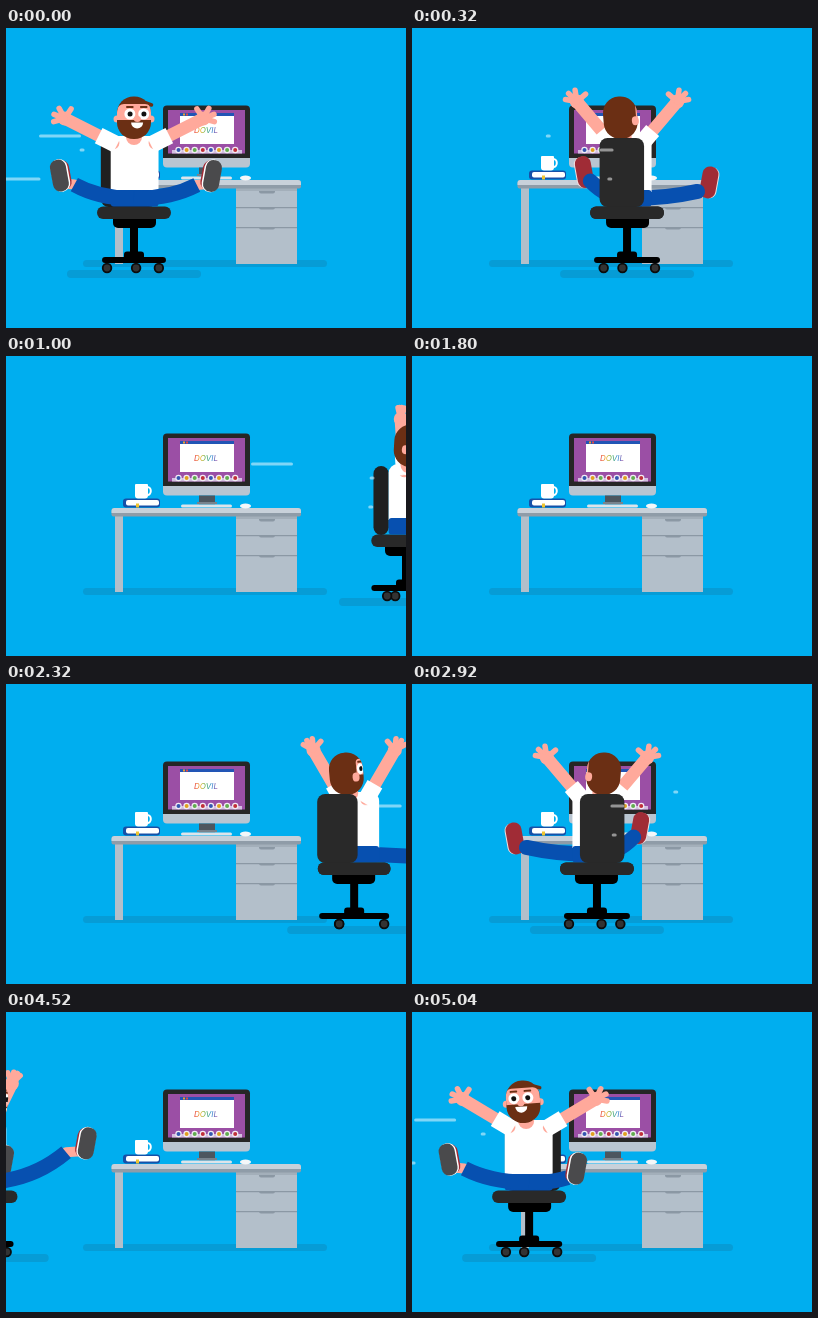
An HTML page with a canvas that plays this animation: 400 px wide and 300 px high, repeating every 5080 ms.

```html
<!DOCTYPE html>
<html lang="en">
<head>
<meta charset="utf-8">
<title>Spinning office chair</title>
<style>
  html, body { margin: 0; width: 100%; height: 100%; overflow: hidden; background: #00aeef; }
  canvas { display: block; }
</style>
</head>
<body>
<canvas id="stage" width="400" height="300"></canvas>
<script>
const ctx = document.getElementById('stage').getContext('2d');
const LOOP = 5080, STEP = 40, SPEED = 0.272, DEG = Math.PI / 180;
const SKIN = '#ffa99b', HAIR = '#6b2f14', JEANS = '#0750b0', SHOE = '#a02c36';
const SHADOW = '#069cd6', METAL = '#b3bfca', SEAT = '#292929';

const mod = (a, n) => ((a % n) + n) % n;

function box(x, y, w, h, color, r = 0) {
  ctx.fillStyle = color;
  ctx.beginPath();
  ctx.roundRect(x, y, w, h, r);
  ctx.fill();
}

function dot(x, y, rx, color, ry = rx) {
  ctx.fillStyle = color;
  ctx.beginPath();
  ctx.ellipse(x, y, rx, ry, 0, 0, 7);
  ctx.fill();
}

function line(x1, y1, x2, y2, color, width, cap = 'round') {
  ctx.strokeStyle = color;
  ctx.lineWidth = width;
  ctx.lineCap = cap;
  ctx.beginPath();
  ctx.moveTo(x1, y1);
  ctx.lineTo(x2, y2);
  ctx.stroke();
}

function group(x, y, turn, draw) {
  ctx.save();
  ctx.translate(x, y);
  ctx.rotate(turn);
  draw();
  ctx.restore();
}

function drawScreen() {
  box(157, 128, 87, 11.5, '#b9c5d1', [0, 0, 4, 4]);
  box(157, 77.5, 87, 52.5, '#262626', [4, 4, 0, 0]);
  box(162, 82, 77, 43.5, '#9b4fa5');
  box(174, 85, 54, 31, '#fff');
  box(174, 85, 54, 3, '#2255b5');
  box(177, 85.5, 2, 2, '#f0a030');
  box(180, 85.5, 2, 2, '#e04848');
  const rainbow = ctx.createLinearGradient(189, 0, 211, 0);
  ['#e8443a', '#f0b429', '#4caf50', '#2a8fd8', '#9b4fa5']
    .forEach((c, i) => rainbow.addColorStop(i / 4, c));
  ctx.fillStyle = rainbow;
  ctx.font = 'italic 8px Inter, sans-serif';
  ctx.textAlign = 'center';
  ctx.fillText('DOVIL', 200, 105);
  box(166, 122, 70, 3.5, '#d3bfe0');
  const icons = ['#3456b0', '#e0a020', '#62ac50', '#c0303a'];
  for (let i = 0; i < 8; i++) {
    dot(172.5 + i * 8.1, 122, 3.2, '#f2ecf5');
    dot(172.5 + i * 8.1, 122, 2, icons[i % 4]);
  }
}

function drawDesk() {
  box(77, 232, 244, 7, SHADOW, 3.5);
  box(109, 158, 8, 78, METAL);
  box(230, 158, 61, 78, METAL);
  box(230, 160, 61, 3, '#a3afba');
  for (const y of [163, 179, 199]) {
    if (y > 163) box(230, y, 61, 1.2, '#8b98a4');
    box(253, y, 16, 2.5, '#8b98a4', [0, 0, 2, 2]);
  }
  box(105.5, 152, 189.5, 8.5, '#8f9ca8', [3, 3, 2, 2]);
  box(105.5, 152, 189.5, 5, '#c8d1da', [3, 3, 0, 0]);
  drawScreen();
  box(193, 139.5, 16, 9, '#4d565f');
  box(191, 146, 20, 2, '#78838d');
  box(175, 148.5, 51, 3, '#dde4ea', 1.5);
  dot(239.5, 150, 5.5, '#f4f7f9', 2.5);
  // Books and cup
  box(117, 142.5, 37, 9, '#1650a8', 3);
  box(120, 144, 33, 5.5, '#fff', 2);
  box(130, 147.5, 3, 4, '#f0c52e');
  box(129, 128, 13, 14.5, '#fff', [1, 1, 3, 3]);
  ctx.strokeStyle = '#fff';
  ctx.lineWidth = 2;
  ctx.beginPath();
  ctx.ellipse(141.5, 135, 3.3, 4, 0, 0, 7);
  ctx.stroke();
}

function drawBase(time) {
  const legs = [0, 120, 240].map(d => 30 * Math.sin((4 + d + 0.335 * time) * DEG));
  const reach = Math.max(...legs.map(Math.abs)) + 5;
  box(-67, 242, 134, 8, SHADOW, 4);
  box(-4, 198, 8, 28, '#000');
  box(-10, 223.5, 20, 8, '#000', 3);
  box(-reach, 229, reach * 2, 6, '#000', 3);
  for (const x of legs) {
    dot(x, 240, 5.2, '#0b0b0b');
    dot(x, 240, 3.4, '#333');
  }
  box(-21, 188, 43, 12, '#000', [0, 0, 5, 5]);
}

function drawSeat(cos) {
  const half = 34.5 + 2.5 * Math.abs(cos);
  box(-half, 178.5, half * 2, 12.5, SEAT, 6);
}

function drawBackrest(sin, cos) {
  const w = (49 + 6 * cos) * Math.abs(cos) + 11 * Math.abs(sin);
  box(-25 * sin - w / 2, 110, w, 69, cos > 0 ? '#202020' : SEAT, Math.min(8, w / 2));
}

function drawShoe(x, y, front) {
  const side = Math.sign(x) || 1;
  group(x, y, side * 0.18, () => {
    if (front) {
      box(-8 - side * 3, -15, 16, 30, SHOE, 8);
      box(-8.5 - side, -16.5, 17, 33, '#fff', 8.5);
    } else {
      box(-8 + side, -15.5, 16, 31, '#f0dede', 7);
    }
    box(-8, -16, 16, 32, front ? '#4a4a4c' : SHOE, 7.5);
  });
}

function drawLeg([x, y], front) {
  const endX = x * (front ? 0.8 : 0.86), endY = y + 9;
  if (front) line(endX, endY, x * 0.94, y + 8, SKIN, 10);
  else drawShoe(x, y, false);
  ctx.strokeStyle = JEANS;
  ctx.lineWidth = 15;
  ctx.lineCap = front ? 'butt' : 'round';
  ctx.beginPath();
  ctx.moveTo(0, 170);
  ctx.quadraticCurveTo(x * 0.45, 171, endX, endY);
  ctx.stroke();
  if (front) drawShoe(x, y, true);
}

function drawArm(x, y, openness) {
  const shoulder = x * 0.3, side = x < 0 ? 1 : -1;
  const aim = Math.atan2(y - 115, x - shoulder);
  const along = k => [shoulder + (x - shoulder) * k, 115 + (y - 115) * k];
  line(shoulder, 115, x, y, SKIN, 12.5);
  line(...along(-0.08), ...along(0.3), '#fff', 17, 'butt');
  dot(x, y, 7, SKIN);
  for (const spread of [1.7, 0.6, -0.1, -0.75]) {
    const a = aim + side * spread * openness;
    line(x, y, x + 11.5 * Math.cos(a), y + 11.5 * Math.sin(a), SKIN, 5.5);
  }
}

function drawFace(angle, sin, cos, edge) {
  const side = sin < 0 ? -1 : 1;
  box(side > 0 ? edge : -18, -14, 18 - edge, 16, SKIN, [7, 7, 0, 0]);
  for (const offset of [-0.43, 0.43]) {
    const facing = Math.cos(angle + offset);
    if (facing < -0.6) continue;
    const x = 17 * Math.sin(angle + offset) - 2 * sin;
    const rx = 5.5 * Math.min(1, 0.8 + 0.5 * facing);
    dot(x, -4, rx, '#fff', 5.5);
    dot(x + sin, -4, Math.min(2.5, rx / 2), '#111', 2.5);
    box(x - rx * 0.7, -12, rx * 1.4, 2, HAIR, 1);
  }
  if (cos > 0) {
    dot(16 * sin, 1, 3.5, SKIN, 3);
    ctx.fillStyle = '#fff';
    ctx.beginPath();
    ctx.arc(15 * sin, 4.5, 6, 0, Math.PI);
    ctx.fill();
  }
}

function drawHead(angle, sin, cos) {
  const x = 9 * Math.sin(2 * angle - 24 * DEG), side = sin < 0 ? -1 : 1;
  const edge = 17 * Math.sin(Math.acos(cos) - 1.75);
  dot(x * 0.5, 109, 8, SKIN);
  group(x, 90, x * 0.012, () => {
    if (cos > 0.7) {
      dot(-17, 1, 3.5, SKIN);
      dot(17, 1, 3.5, SKIN);
      line(12, -15, 17.5, -13, HAIR, 3.5);
    }
    ctx.save();
    ctx.beginPath();
    ctx.roundRect(-17, -21.5, 34, 42.5, 16.5);
    ctx.clip();
    box(-18, -22, 36, 44, HAIR);
    drawFace(angle, sin, cos, edge);
    ctx.restore();
    if (cos <= 0.7) dot(side * (edge - 1), 4, 3.5, SKIN, 4.5);
  });
}

// Each line shoots up behind the chair, then shrinks to a dash that falls back.
function drawTrails(time) {
  for (const [y, peak, top] of [[108, 38, -34], [122, 277, -7], [151, 195, 4]]) {
    const age = mod(time - peak + 250, 560) - 250;
    const head = top + (age < 0 ? 0.5 : -0.15) * age;
    const length = Math.max(5, 42 - 0.65 * Math.max(age, 0));
    line(head - length + 1.5, y, head - 1.5, y, 'rgba(255,255,255,.5)', 3);
  }
}

function drawRider(time) {
  const degrees = 12 + 0.513 * time - 0.00008 * time * time;
  const angle = degrees * DEG, sin = Math.sin(angle), cos = Math.cos(angle);
  const front = cos >= 0, half = 20 + 4 * Math.abs(cos);

  const reach = Math.cos(angle - 6 * DEG);
  const handX = reach * Math.sqrt(Math.abs(reach)) * (62 + 8 * cos);
  const handY = 57 + reach * reach * (25 + 8 * cos) + 5 * sin;
  const feet = [
    [85 * sin * Math.abs(sin) - 80 * cos, 151 - 3.5 * cos],
    [86 * sin + 62 * cos, 151 + 2 * cos - 24 * sin]
  ];
  const drawLegs = () => feet.forEach(foot => drawLeg(foot, front));

  drawBase(time);
  drawSeat(cos);
  if (front) drawBackrest(sin, cos);
  else drawLegs();
  box(3 * sin - half, 108, half * 2, 56, '#fff', [9, 9, 0, 0]);
  box(3 * sin - half, 162, half * 2, 16.5, JEANS, 3);
  if (front) drawLegs();
  for (const side of [-1, 1]) drawArm(side * handX, handY, 0.2 + 0.8 * reach * reach);
  drawHead(angle, sin, cos);
  if (!front) {
    drawBackrest(sin, cos);
    drawSeat(cos);
  }
  drawTrails(time);
}

function render(now) {
  const t = Math.floor((now + 2) / STEP) * STEP % LOOP;
  const leftward = t >= 1560 && t < 4100;
  const time = leftward ? t - 2600 : t < 1560 ? t : t - LOOP;

  box(0, 0, 400, 300, '#00aeef');
  drawDesk();
  if (time >= -800 && time <= 1320) {
    ctx.save();
    if (leftward) {
      ctx.translate(400, 0);
      ctx.scale(-1, 1);
    }
    ctx.translate(128 + SPEED * time, 0);
    drawRider(time);
    ctx.restore();
  }
  requestAnimationFrame(render);
}
requestAnimationFrame(render);
</script>
</body>
</html>
```
